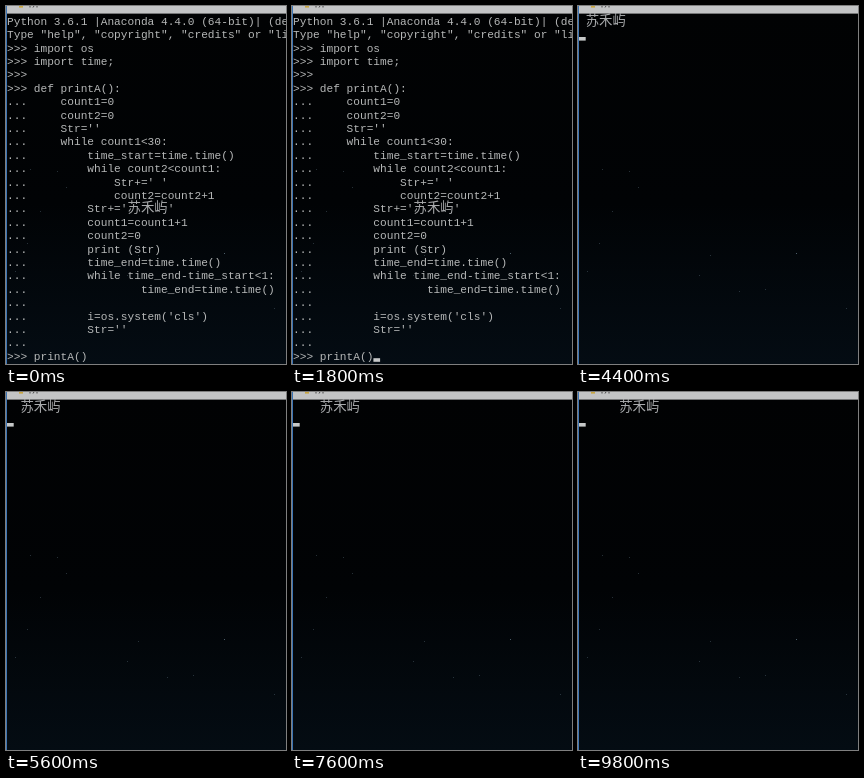
These frames come from a looping animation (280x358 px, 10000 ms). An HTML page:

```html
<!DOCTYPE html>
<html lang="zh">
<head>
<meta charset="utf-8">
<title>Console</title>
<style>
html, body { margin: 0; width: 100%; height: 100%; overflow: hidden; background: #020305; }
svg { display: block; width: 100%; height: 100%; }
text { white-space: pre; fill: #b6b8b8; font: 11.165px "Liberation Mono", monospace; }
.name { fill: #a9abad; font: 300 13.4px "Noto Sans CJK SC", "Noto Sans CJK", sans-serif; }
</style>
</head>
<body>
<svg id="stage" viewBox="0 0 280 358">
  <defs>
    <linearGradient id="sky" x1="0" y1="0" x2="0" y2="1">
      <stop offset="0" stop-color="#010203"/>
      <stop offset=".55" stop-color="#010305"/>
      <stop offset="1" stop-color="#040c13"/>
    </linearGradient>
  </defs>
  <rect width="280" height="358" fill="url(#sky)"/>
  <g id="stars" fill="#7f98a8"></g>
  <g id="code"></g>
  <g id="output"></g>
  <rect id="cursor" width="6.7" height="3.6" fill="#c6c8c8"/>
  <rect width="280" height="7.6" fill="#c3c4c5"/>
  <rect x="13" width="4" height="1.6" fill="#c9a640"/>
  <path d="M24 0v1.5M28 0l-1 1.5M31 0v1.5" stroke="#444" fill="none"/>
  <rect width="1" height="358" fill="#3c74b4"/>
</svg>
<script>
const LOOP = 10000, CELL = 6.7, ROW = 13.4, LEFT = 1, TOP = 8;
const NAME = '苏禾屿';
const $ = id => document.getElementById(id);

const lines = [
  'Python 3.6.1 |Anaconda 4.4.0 (64-bit)| (default',
  'Type "help", "copyright", "credits" or "license"',
  '>>> import os',
  '>>> import time;',
  '>>>',
  '>>> def printA():',
  '...     count1=0',
  '...     count2=0',
  "...     Str=''",
  '...     while count1<30:',
  '...         time_start=time.time()',
  '...         while count2<count1:',
  "...             Str+=' '",
  '...             count2=count2+1',
  "...         Str+='@'",
  '...         count1=count1+1',
  '...         count2=0',
  '...         print (Str)',
  '...         time_end=time.time()',
  '...         while time_end-time_start<1:',
  '...                 time_end=time.time()',
  '...',
  "...         i=os.system('cls')",
  "...         Str=''",
  '...',
  '>>> printA()'
];

// start time, leading spaces (-1: code listing, 0: first print below it), cursor visible
const steps = [
  [0, -1, 0], [1800, -1, 1], [2400, -1, 0], [3000, -1, 1], [3400, 0, 0],
  [4400, 1, 1], [5000, 1, 0], [5400, 2, 1], [6200, 2, 0],
  [6600, 3, 1], [7200, 3, 0], [7600, 4, 1], [8200, 4, 0],
  [8800, 5, 1], [9400, 5, 0], [9800, 6, 1]
];

const stars = [[24, 163], [51, 165], [60, 181], [34, 205], [21, 237], [132, 249],
  [218, 247], [121, 269], [161, 285], [187, 283], [268, 302], [9, 265]];

function add(parent, tag, attrs, text = '') {
  const el = document.createElementNS('http://www.w3.org/2000/svg', tag);
  for (const k in attrs) el.setAttribute(k, attrs[k]);
  el.textContent = text;
  parent.append(el);
  return el;
}

const colX = col => LEFT + col * CELL;
const write = (parent, text, col, row, cls = '') =>
  add(parent, 'text', { x: colX(col), y: TOP + row * ROW + 10.7, class: cls }, text);

lines.forEach((line, row) => {
  const [head, tail] = line.split('@');
  write($('code'), head, 0, row);
  if (tail) {
    write($('code'), NAME, head.length, row, 'name');
    write($('code'), tail, head.length + 2 * NAME.length, row);
  }
});
const first = write($('code'), NAME, 0, lines.length, 'name');
const printed = write($('output'), NAME, 0, 0, 'name');
stars.forEach(([x, y]) => add($('stars'), 'rect',
  { x, y, width: 1, height: 1, opacity: x === 218 ? .6 : .3 }));

const show = (el, on) => el.setAttribute('visibility', on ? 'visible' : 'hidden');

function draw(now) {
  const t = now % LOOP;
  const [, spaces, blink] = steps.filter(s => s[0] <= t).pop();
  const running = spaces > 0;
  $('code').style.display = running ? 'none' : '';
  show(first, spaces === 0);
  show(printed, running);
  printed.setAttribute('x', colX(Math.max(spaces, 0)));
  const cursor = $('cursor');
  show(cursor, blink);
  cursor.setAttribute('x', running ? LEFT : colX(12));
  cursor.setAttribute('y', running ? 31 : 352.2);
}

const start = performance.now();
function tick() {
  draw(performance.now() - start);
  requestAnimationFrame(tick);
}
tick();
</script>
</body>
</html>
```
